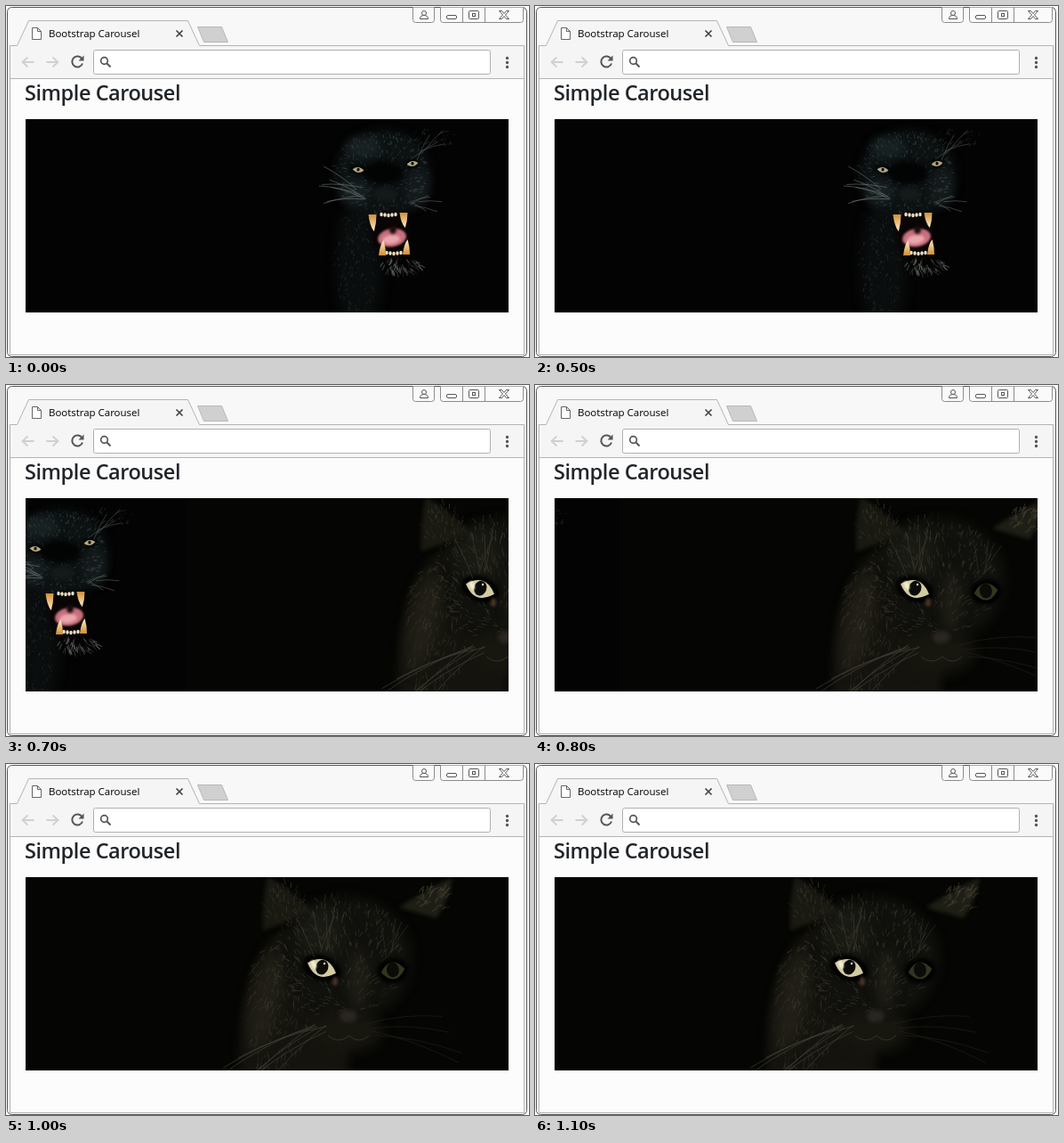
Recreate the animation shown at these times as an HTML page with a canvas. Size 588 by 394 pixels, loop 1900 ms.

```html
<!DOCTYPE html>
<html lang="en">
<head>
<meta charset="utf-8">
<title>Simple Carousel</title>
<style>
  html, body { margin: 0; width: 100%; height: 100%; overflow: hidden; background: #fff; }
  svg { display: block; width: 588px; height: 394px; }
  text { font-family: "Open Sans", "Noto Sans", sans-serif; }
  .tab { font-size: 11.5px; letter-spacing: -.03px; fill: #000; }
  .title { font-size: 23.5px; font-weight: 600; letter-spacing: -.45px; fill: #212529; }
  .view { position: absolute; left: 22px; top: 127px; width: 543px; height: 217px; overflow: hidden; }
  canvas { display: block; animation: slide 1900ms step-end infinite; }
  /* The slide eases out, but shows only every 100 ms. */
  @keyframes slide {
    0% { transform: none; }
    26.31% { transform: translateX(-5px); }
    31.57% { transform: translateX(-152px); }
    36.84% { transform: translateX(-363px); }
    42.1% { transform: translateX(-469px); }
    47.36% { transform: translateX(-522px); }
    52.63% { transform: translateX(-541px); }
    57.89%, 100% { transform: translateX(-543px); }
  }
</style>
</head>
<body>
<svg viewBox="0 0 588 394" fill="none">
  <g transform="translate(.5 .5)">
    <!-- window -->
    <rect x="1" y="1" width="584" height="392" rx="5" fill="#f8f8f8" stroke="#555"/>
    <path d="M5 44H12L25 16H204L217 44H582V81H5Z" fill="#f5f5f5"/>
    <rect x="4" y="81" width="578" height="310" fill="#fcfcfc"/>
    <path d="M4 391V44H12L25 16H204L217 44H582V391ZM4 81H582" stroke="#b4b4b4" stroke-linejoin="round"/>
    <path d="M215 23H242L249 40H222Z" fill="#d0d0d0" stroke="#b8b8b8" stroke-linejoin="round"/>

    <!-- caption buttons -->
    <g stroke="#8c8c8c" fill="#fafafa">
      <path d="M457 1V15Q457 18 460 18H478Q481 18 481 15V1"/>
      <path d="M488 1V15Q488 18 491 18H578Q581 18 581 15V1M513 1V18M538 1V18"/>
    </g>
    <g stroke="#555" fill="#fff">
      <path d="M465 14Q465 10 469.500 10T474 14Z"/>
      <circle cx="469.500" cy="7.500" r="2.500"/>
      <rect x="495" y="10" width="11" height="4" rx="1.500"/>
      <rect x="520" y="5" width="11" height="9" rx="1"/>
      <rect x="524" y="8" width="3" height="3"/>
      <path d="M554 5H557L559.500 8L562 5H565L561 9.500L565 14H562L559.500 11L557 14H554L558 9.500Z"/>
    </g>

    <!-- tab and toolbar -->
    <path d="M29 24H35L39 28V37H29ZM35 24V28H39" fill="#fff" stroke="#666"/>
    <path d="M191 27L198 34M198 27L191 34" stroke="#444" stroke-width="1.700"/>
    <path d="M31 62.500H18M24 57L18 62.500L24 68M45 62.500H58M52 57L58 62.500L52 68" stroke="#d0d0d0" stroke-width="1.800"/>
    <path d="M85 59A6 6 0 1 0 85.500 64" stroke="#555" stroke-width="2"/>
    <path d="M87 55V61H81Z" fill="#555"/>
    <rect x="98" y="49" width="446" height="27" rx="2" fill="#fff" stroke="#b0b0b0"/>
    <circle cx="110" cy="61" r="3.800" stroke="#555" stroke-width="1.700"/>
    <path d="M113 64L117 68" stroke="#555" stroke-width="2"/>
    <path d="M563 58V69" stroke="#555" stroke-width="3.400" stroke-linecap="round" stroke-dasharray="0 5"/>
  </g>
  <text class="tab" x="48" y="35">Bootstrap Carousel</text>
  <text class="title" x="21" y="106">Simple Carousel</text>
</svg>
<div class="view"><canvas width="1086" height="217"></canvas></div>

<script>
  const WIDTH = 543, HEIGHT = 217;
  const ctx = document.querySelector('canvas').getContext('2d');
  let seed = 17;
  const rand = () => (seed = seed * 16807 % 2147483647) / 2147483647;
  const spread = () => rand() - .5;

  function blob(x, y, rx, ry, color, blur = 0, tilt = 0) {
    ctx.filter = blur ? `blur(${blur}px)` : 'none';
    ctx.fillStyle = color;
    ctx.beginPath();
    ctx.ellipse(x, y, rx, ry, tilt, 0, Math.PI * 2);
    ctx.fill();
    ctx.filter = 'none';
  }

  function hair(x, y, angle, length, bend = 0) {
    const u = x + Math.cos(angle) * length, v = y + Math.sin(angle) * length;
    ctx.beginPath();
    ctx.moveTo(x, y);
    ctx.quadraticCurveTo((x + u) / 2, (y + v) / 2 + bend, u, v);
    ctx.stroke();
  }

  // Short strands over an ellipse, combed away from a root point.
  function fur(count, x, y, rx, ry, rootX, rootY, color, length = 4) {
    ctx.strokeStyle = color;
    ctx.lineWidth = .8;
    for (let i = 0; i < count; i++) {
      const a = rand() * Math.PI * 2, r = Math.sqrt(rand());
      const px = x + Math.cos(a) * r * rx, py = y + Math.sin(a) * r * ry;
      ctx.globalAlpha = .15 + rand() * .85;
      hair(px, py, Math.atan2(py - rootY, px - rootX) + spread(), length * (.4 + rand()));
    }
    ctx.globalAlpha = 1;
  }

  // Whiskers that fan out between two angles.
  function fan(count, x, y, from, to, length, color) {
    ctx.strokeStyle = color;
    ctx.lineWidth = .6;
    for (let i = 0; i < count; i++) {
      const angle = from + (to - from) * i / (count - 1);
      hair(x + spread() * 16, y + spread() * 16, angle, length * (.75 + rand() * .25), -length / 14);
    }
  }

  function eye(x, y, w, h, tilt, color, pupil) {
    ctx.save();
    ctx.translate(x, y);
    ctx.rotate(tilt);
    blob(0, 0, w * .65, h * .75, '#000', 2);
    ctx.fillStyle = color;
    ctx.beginPath();
    ctx.moveTo(-w / 2, 0);
    ctx.quadraticCurveTo(0, -h, w / 2, 0);
    ctx.quadraticCurveTo(0, h, -w / 2, 0);
    ctx.fill();
    blob(0, -h * .05, pupil, pupil * 1.2, '#0b0c08');
    ctx.restore();
  }

  // A negative height makes a fang that points up.
  function fang(x, y, w, h) {
    const tone = ctx.createLinearGradient(0, y, 0, y + h);
    tone.addColorStop(0, '#d28f35');
    tone.addColorStop(1, '#fff0cc');
    ctx.fillStyle = tone;
    ctx.beginPath();
    ctx.moveTo(x - w / 2, y);
    ctx.lineTo(x + w / 2, y);
    ctx.quadraticCurveTo(x + w / 2, y + h / 2, x + w / 5, y + h);
    ctx.quadraticCurveTo(x - w / 3, y + h * .7, x - w / 2, y);
    ctx.fill();
  }

  function teeth(x, y) {
    for (let i = 0; i < 5; i++) blob(x + i * 4, y + Math.abs(i - 2) * -.5, 1.7, 2.2, '#efe2c4');
  }

  function ear(x, y, tipX, tipY, endX, endY, color) {
    ctx.filter = 'blur(2px)';
    ctx.fillStyle = color;
    ctx.beginPath();
    ctx.moveTo(x, y);
    ctx.quadraticCurveTo((x + tipX) / 2 - 4, (y + tipY) / 2, tipX, tipY);
    ctx.quadraticCurveTo((tipX + endX) / 2 + 6, (tipY + endY) / 2, endX, endY);
    ctx.fill();
    ctx.filter = 'none';
  }

  function slide(x, color, draw) {
    ctx.save();
    ctx.translate(x, 0);
    ctx.beginPath();
    ctx.rect(0, 0, WIDTH, HEIGHT);
    ctx.clip();
    ctx.fillStyle = color;
    ctx.fillRect(0, 0, WIDTH, HEIGHT);
    draw();
    ctx.restore();
  }

  function panther() {
    blob(375, 165, 26, 80, '#0a0d0d', 6);
    blob(402, 62, 54, 50, '#0c1112', 5);
    blob(380, 32, 20, 12, '#182122', 5);
    blob(370, 82, 16, 14, '#182021', 5);
    blob(440, 76, 14, 22, '#141a1b', 5);
    fur(420, 400, 60, 52, 46, 404, 80, '#39474a', 3);
    fur(160, 372, 160, 24, 60, 390, 60, '#2c3334', 3);
    fur(45, 455, 22, 30, 10, 410, 60, '#323b36');
    blob(403, 60, 23, 13, '#020303', 3);
    blob(404, 84, 13, 8, '#14191a', 2);
    eye(374, 57, 13, 6, .1, '#b5a882', 1.6);
    eye(435, 50, 13, 6, -.15, '#b5a882', 1.6);

    blob(410, 130, 22, 27, '#0a0505', 2, -.15);
    blob(412, 133, 16, 10, '#c86f7c', 1, -.15);
    blob(411, 135, 10, 5, '#eaa7b0', 1.5, -.15);
    blob(413, 124, 4, 5, '#1a0a0b', 1.5);
    teeth(400, 108);
    teeth(406, 151);
    fang(390, 107, 9, 19);
    fang(425, 105, 9, 17);
    fang(401, 153, 8, -17);
    fang(428, 152, 8, -17);
    fur(70, 422, 163, 21, 9, 414, 140, '#757a74', 6);

    fan(7, 377, 84, 2.95, 3.75, 48, '#6d7672');
    fan(5, 438, 92, -.5, .5, 28, '#59625f');
    fan(4, 440, 42, -1.1, -.3, 38, '#4d5652');
  }

  function cat() {
    blob(300, 195, 62, 138, '#14130d', 4);
    blob(358, 92, 74, 70, '#10100c', 6);
    ear(265, 60, 270, -2, 322, 40, '#191811');
    ear(418, 34, 478, 0, 460, 46, '#1f1e16');
    blob(330, 65, 26, 32, '#1a1a14', 8);
    blob(268, 140, 15, 55, '#211f17', 7, .2);
    blob(360, 172, 38, 24, '#17160f', 7);
    blob(372, 115, 12, 35, '#1d1c15', 6);
    fur(420, 350, 90, 70, 68, 362, 150, '#3d3b2f', 6);
    fur(260, 280, 150, 34, 75, 310, 30, '#37342a', 6);
    fur(70, 290, 32, 22, 24, 300, 75, '#3b3a2e', 6);
    fur(60, 455, 25, 20, 14, 420, 60, '#57533f', 6);

    eye(331, 102, 34, 19, .35, '#d3cba2', 7);
    blob(322, 98, 2.5, 5, '#f3eed4', 1, -.4);
    blob(334, 97, 1.2, 1.2, '#dfe2d4');
    blob(346, 117, 3, 5, '#4a3329', 1.5);
    eye(411, 105, 27, 19, -.15, '#35341f', 7);
    blob(361, 156, 10, 7, '#2a2622', 2);
    ctx.strokeStyle = '#34312a';
    ctx.lineWidth = 1;
    hair(362, 178, Math.PI, 24, 10);
    hair(362, 178, 0, 22, 10);

    fan(7, 330, 168, 2.35, 2.8, 130, '#4b4940');
    fan(4, 388, 172, -.1, .35, 110, '#24231c');
    fan(5, 330, 85, -2, -1.2, 50, '#403e33');
    fan(4, 410, 90, -1.7, -1, 45, '#35332a');
  }

  slide(0, '#030303', panther);
  slide(WIDTH, '#050603', cat);
</script>
</body>
</html>
```
